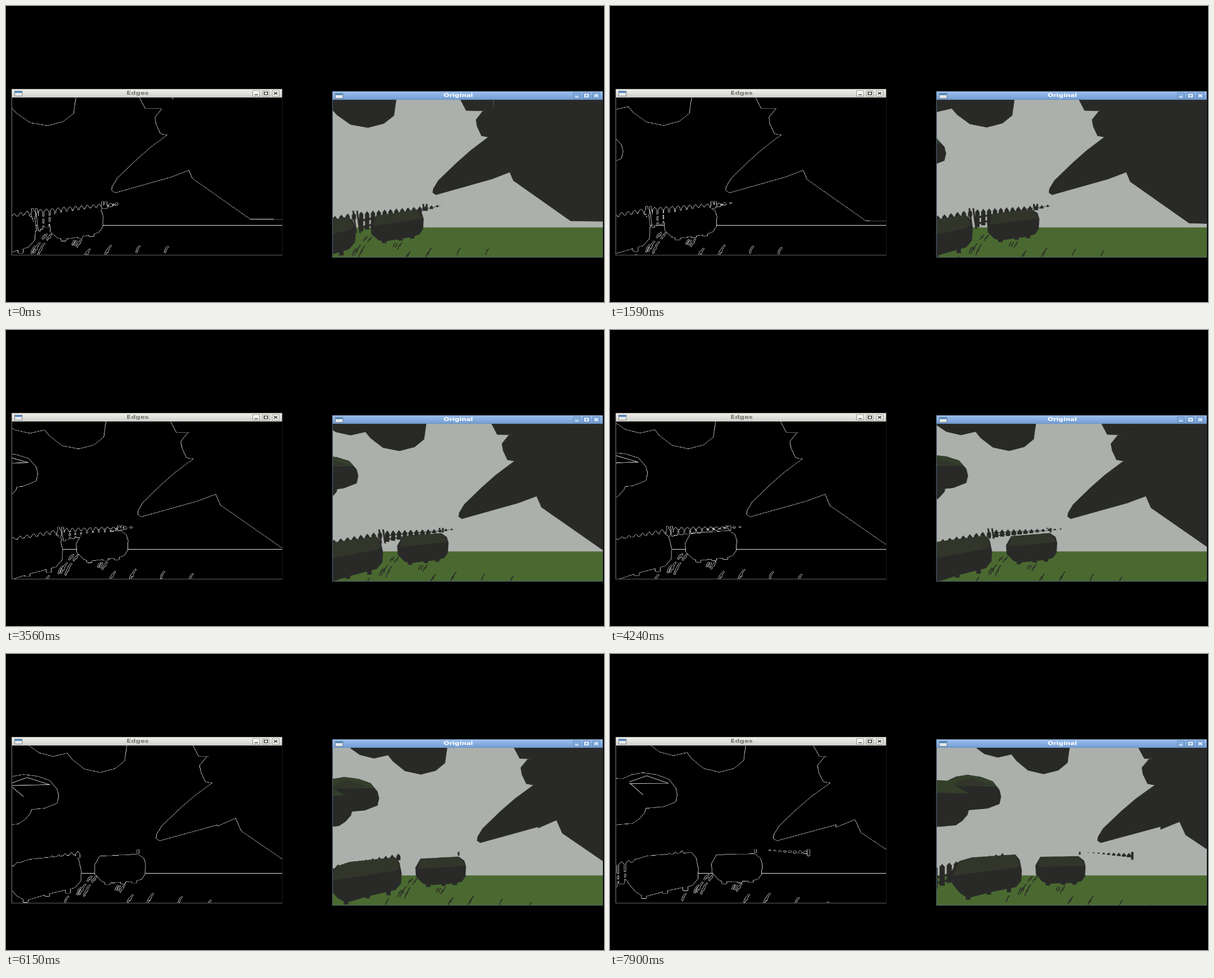
Recreate the animation shown at these times as an HTML page with a canvas. Size 1063 by 527 pixels, loop 8 s.

```html
<!DOCTYPE html>
<html lang="en">
<head>
<meta charset="utf-8">
<title>Edges</title>
<style>
html, body { margin: 0; width: 100%; height: 100%; overflow: hidden; background: #000; }
canvas { display: block; }
</style>
</head>
<body>
<canvas id="stage" width="1063" height="527"></canvas>
<script>
const LOOP = 8000;
// The camera picture, and the units in which the scene is laid out
const CAM_W = 640, CAM_H = 480, W = 480, H = 280;
const SKY = '#acb0ac', GRASS = '#4a6930', DARK = '#292a28', LIT = '#32362a', LEAF = '#333f2b';
const HORIZON = 226.9, FOCAL = 525;

const stage = document.getElementById('stage').getContext('2d');
stage.imageSmoothingQuality = 'high';

function layer() {
  const c = document.createElement('canvas');
  c.width = CAM_W;
  c.height = CAM_H;
  const ctx = c.getContext('2d', { willReadFrequently: true });
  ctx.scale(CAM_W / W, CAM_H / H);
  return ctx;
}
const g = layer(), edge = layer();

// Runs of evenly spaced updates: first, last, count
const RUNS = [[0, 280, 2], [590, 1310, 6], [1590, 1990, 3], [2300, 2550, 2], [2830, 3250, 4],
  [3560, 3560, 1], [3840, 4240, 3], [4550, 5260, 3], [5690, 5840, 2], [6150, 6150, 1],
  [6430, 6830, 3], [7100, 7590, 4], [7900, 7900, 1]];
const STEPS = RUNS.flatMap(([from, to, n]) =>
  Array.from({ length: n }, (_, i) => from + (to - from) * i / Math.max(1, n - 1)));

// Camera pan over time
const PAN = [[0, 0], [1590, 0.206], [2830, 0.35], [4240, 0.525], [5260, 0.63], [6830, 0.85], [7900, 1.035]];
const mix = (a, b, u) => a + (b - a) * u;
function panAt(t) {
  const i = Math.max(1, PAN.findIndex(k => k[0] >= t));
  const [t0, p0] = PAN[i - 1], [t1, p1] = PAN[i];
  return mix(p0, p1, (t - t0) / (t1 - t0));
}

// Masses as they stand halfway through the pan; pace and lean say how they turn
const TOP = { pace: 125, lean: 0, pts: [289, -2, 300, 19, 350, 20, 350, -2] };
const BRANCH = { pace: 104, lean: 0, pts: [319, 20, 307, 35, 309, 47, 317, 64, 329, 66, 297, 90, 272, 112,
  240, 143, 231, 158, 230, 165, 236, 169, 336, 141, 420, 110, 420, 10] };
const HILL = { pace: 109, lean: 0.07, pts: [336, 141, 368, 126, 378, 149, 487, 225, 600, 230, 600, -60, 345, -60] };
const CANOPY = { pace: 117, lean: 0.03, pts: [174, -2, 170, 27, 153, 41, 126, 48, 97, 42, 75, 25, 66, 14,
  40, 20, 14, 14, -4, 2, -12, -10] };
const CROWN = { pace: 106, lean: 0.06, pts: [-130, 65, -52, 67, -34, 59, -12, 55, 15, 58, 37, 65, 50, 80,
  53, 92, 50, 105, 27, 114, -10, 118, -130, 118] };
const CROWN_LOW = { pace: 70, lean: 0.02, pts: [20, 90, 12, 121, 2, 132, -10, 140, -40, 143, -90, 143, -90, 80] };
const part = (owner, pts) => ({ ...owner, pts });
const CROWN_TOP = part(CROWN, [-130, 65, -52, 67, -34, 60, -12, 55, 15, 58, 37, 66, 44, 74, -35, 75, -10, 88, -130, 90]);
const CROWN_FACE = part(CROWN, [-39, 72, -5, 60, 36, 72, -39, 75]);
const CROWN_FOLD = part(CROWN, [-36, 75, -12, 94]);

const GROUND = { pace: 99, lean: 0.13 };
const BUSHES = [
  { body: [130, 200, 199, 194, 209, 201, 212, 211, 211, 229, 205, 238, 192, 242, 144, 247, 134, 244,
    122, 232, 121, 216],
  lit: [130, 200, 199, 194, 211, 210, 126, 218],
  feet: [144, 247, 172, 244, 192, 242] },
  { body: [-22, 218, 1, 210, 84, 199, 92, 208, 96, 227, 95, 245, 85, 257, 35, 270, -6, 283, -22, 275,
    -36, 260, -40, 241, -31, 225],
  lit: [-22, 218, 1, 210, 84, 199, 92, 216, 88, 222, -36, 245],
  feet: [-6, 283, 34, 271, 72, 264] }
];
// Tufts: x, y, blades, height
const TUFTS = [[116, 241, 4, 7], [101, 261, 5, 13], [167, 256, 4, 8], [185, 275, 2, 10],
  [221, 271, 2, 13], [274, 273, 1, 12], [325, 277, 1, 11], [70, 279, 1, 12]];

// Yaw of the camera moves a mass along a tangent curve
function turn({ pace, lean, pts }, p) {
  const k = p - 0.5, out = [];
  for (let i = 0; i < pts.length; i += 2) {
    const angle = Math.atan((pts[i] - W / 2) / FOCAL) + k * pace / FOCAL;
    out.push(W / 2 + FOCAL * Math.tan(angle), pts[i + 1] + k * lean * (pts[i] - 220));
  }
  return out;
}

function trace(c, pts) {
  c.beginPath();
  for (let i = 0; i < pts.length; i += 2) c.lineTo(pts[i], pts[i + 1]);
}
function poly(pts, color = DARK) {
  trace(g, pts);
  g.fillStyle = color;
  g.fill();
}

function picket(x, y, w, h) {
  const tip = Math.min(5, h * 0.6);
  poly([x - w / 2, y + tip, x, y, x + w / 2, y + tip, x + w / 2, y + h, x - w / 2, y + h]);
}

function fence(p) {
  // Near run, growing toward the left of its corner
  const corner = Math.min(117, 38 + 105 * p);
  const top = 187 + 13 * (1 - p) ** 2;
  for (let n = 0; n < 14; n++) {
    const d = n * (11 + n * 0.1);
    picket(corner - d, top + d * 0.18, 7.5 + n * 0.2, 12 + 3 * n);
  }
  for (const k of [12, 22]) {
    poly([corner, top + k, corner - 150, top + k + 38, corner - 150, top + k + 42, corner, top + k + 2]);
  }

  // Far run, sinking out of sight as the camera turns
  const left = Math.max(0, 1 - p / 0.66);
  const tall = 34 * Math.max(0, 1 - (p / 0.66) ** 2);
  const y0 = 185 + 14 * left, start = corner + 9, end = 196 + 52 * p;
  if (tall > 1) {
    for (const x of [corner - 1, corner + 6]) {
      const h = tall + 4;
      poly([x - 2, y0 - 2, x + 1, y0 - 2, x + 2 + h * 0.12, y0 + h, x - 1 + h * 0.12, y0 + h]);
    }
    for (let x = start + 4; x < end; x += 10.4) {
      const u = (x - start) / (end - start), h = tall * (1 - u) + 2;
      picket(x, mix(y0, 185.5, u), Math.min(7.5, 2 + h * 0.6), h);
    }
    for (const k of [0.42, 0.8]) {
      poly([start, y0 + tall * k, end, 187, start, y0 + tall * (k + 0.12)]);
    }
  }

  const post = 165 + 50 * p + 33 * p * p, size = 11 - 6 * p;
  g.fillRect(post + 1, 185, 3, size);
  g.fillRect(post - 5, 185, 3, size * left);

  // Last run, rising into view at the end
  const rise = (p - 0.85) / 0.185;
  if (rise > -0.3) {
    const x = 329 + rise * 19;
    g.fillRect(x - 2, 185, 4, Math.max(3, 4 + rise * 10));
    for (let j = 1; j < 10; j++) {
      const h = j * 0.85 * rise;
      if (h > 0.3) picket(x - 87 + j * 9, 185 + j * 0.2, 2 + h * 0.8, h);
    }
  }
}

function bush({ body, lit, feet }, p) {
  poly(turn({ ...GROUND, pts: body }, p));
  poly(turn({ ...GROUND, pts: lit }, p), LIT);
  const f = turn({ ...GROUND, pts: feet }, p);
  g.fillStyle = DARK;
  for (let i = 0; i < f.length; i += 2) g.fillRect(f[i] - 4, f[i + 1] - 5, 8, 8);
}

function tuft([cx, cy, blades, tall], p) {
  const [x, y] = turn({ ...GROUND, pts: [cx, cy] }, p);
  g.strokeStyle = DARK;
  g.lineWidth = 1.6;
  for (let i = 0; i < blades; i++) {
    const bx = x + (i - (blades - 1) / 2) * 4 - tall * 0.25;
    const by = y + tall / 2 + Math.sin(i * 2.4 + cx) * tall * 0.35 * (blades > 1);
    g.beginPath();
    g.moveTo(bx, by);
    g.quadraticCurveTo(bx + 1, by - tall * 0.65, bx + tall * 0.5, by - tall);
    g.stroke();
  }
}

function scene(p) {
  g.fillStyle = SKY;
  g.fillRect(0, 0, W, H);
  g.fillStyle = GRASS;
  g.fillRect(0, HORIZON, W, H - HORIZON);
  for (const mass of [TOP, BRANCH, HILL, CANOPY, CROWN_LOW, CROWN]) poly(turn(mass, p));
  poly(turn(CROWN_TOP, p), LEAF);
  poly(turn(CROWN_FACE, p), LIT);
  fence(p);
  BUSHES.forEach(b => bush(b, p));
  TUFTS.forEach(t => tuft(t, p));
}

// Sort pixels into dark, sky and grass, then light those next to a lower class
function findEdges(p) {
  const src = g.getImageData(0, 0, CAM_W, CAM_H).data;
  const out = edge.createImageData(CAM_W, CAM_H);
  const kind = new Uint8Array(CAM_W * CAM_H);
  for (let i = 0; i < kind.length; i++) {
    const green = src[i * 4 + 1], blue = src[i * 4 + 2];
    kind[i] = green - blue > 40 ? 2 : green > 108 ? 1 : 0;
  }
  for (let y = 0; y < CAM_H; y++) {
    for (let x = 0; x < CAM_W; x++) {
      const i = y * CAM_W + x, k = kind[i];
      const on = (x > 0 && kind[i - 1] < k) || (x < CAM_W - 1 && kind[i + 1] < k) ||
        (y > 0 && kind[i - CAM_W] < k) || (y < CAM_H - 1 && kind[i + CAM_W] < k);
      out.data.fill(on ? 255 : 0, i * 4, i * 4 + 3);
      out.data[i * 4 + 3] = 255;
    }
  }
  edge.putImageData(out, 0, 0);
  if (p > 0.42) {
    edge.strokeStyle = '#fff';
    edge.lineWidth = 0.8;
    for (const fold of [CROWN_FACE, CROWN_FOLD]) {
      trace(edge, turn(fold, p));
      edge.stroke();
    }
  }
}

const PLAIN = { light: '#f0f0ec', deep: '#cfcfca', ink: '#77776f', rim: '#6a6a66',
  key: '#f4f4f0', keyRim: '#77776f', sign: '#333' };
const ACTIVE = { light: '#9dc0ec', deep: '#6f9bd2', ink: '#fff', rim: '#4d5c70',
  key: '#86aede', keyRim: '#5276a6', sign: '#fff' };

// A desktop window whose picture has its corner at x, y
function frame(x, y, title, look, picture) {
  const c = stage;
  c.fillStyle = look.rim;
  c.fillRect(x - 1, y - 27, CAM_W + 2, CAM_H + 28);
  const bar = c.createLinearGradient(0, y - 26, 0, y);
  bar.addColorStop(0, look.light);
  bar.addColorStop(1, look.deep);
  c.fillStyle = bar;
  c.fillRect(x, y - 26, CAM_W, 25);

  c.fillStyle = '#555b62';
  c.fillRect(x + 6, y - 21, 19, 16);
  c.fillStyle = '#e8eaea';
  c.fillRect(x + 7, y - 20, 17, 14);
  c.fillStyle = '#4b83bd';
  c.fillRect(x + 7, y - 20, 17, 5);

  c.fillStyle = look.ink;
  c.font = 'bold 15.5px "DejaVu Sans", sans-serif';
  c.textAlign = 'center';
  c.fillText(title, x + 298, y - 8.5);

  for (let n = 0; n < 3; n++) {
    const bx = x + 579 + n * 23, by = y - 13.5;
    c.fillStyle = look.keyRim;
    c.fillRect(bx - 8.5, by - 9, 17, 18);
    c.fillStyle = look.key;
    c.fillRect(bx - 7.5, by - 8, 15, 16);
    c.strokeStyle = look.sign;
    c.lineWidth = 2.2;
    c.beginPath();
    if (n === 0) {
      c.moveTo(bx - 4, by + 4);
      c.lineTo(bx + 4, by + 4);
    } else if (n === 1) {
      c.rect(bx - 4, by - 4, 8, 8);
    } else {
      c.moveTo(bx - 4, by - 4);
      c.lineTo(bx + 4, by + 4);
      c.moveTo(bx + 4, by - 4);
      c.lineTo(bx - 4, by + 4);
    }
    c.stroke();
  }
  c.drawImage(picture, x, y);
}

function draw(n) {
  const t = STEPS[n], next = STEPS[n + 1] || LOOP;
  const now = panAt(t);
  // The edge view trails one step behind while updates come quickly
  const late = n > 0 && next - t < 210 ? panAt(STEPS[n - 1]) : now;

  // The whole desktop is shown squeezed onto the stage
  stage.setTransform(W / CAM_W, 0, 0, H / CAM_H, 0, 0);
  stage.fillStyle = '#000';
  stage.fillRect(0, 0, 1420, 910);
  scene(late);
  findEdges(late);
  frame(14, 280, 'Edges', PLAIN, edge.canvas);
  scene(now);
  frame(774, 287, 'Original', ACTIVE, g.canvas);
}

let shown = -1;
const begin = performance.now();
function tick() {
  const t = (performance.now() - begin) % LOOP;
  let n = STEPS.length - 1;
  while (STEPS[n] > t) n--;
  if (n !== shown) draw(shown = n);
  requestAnimationFrame(tick);
}
tick();
</script>
</body>
</html>
```
